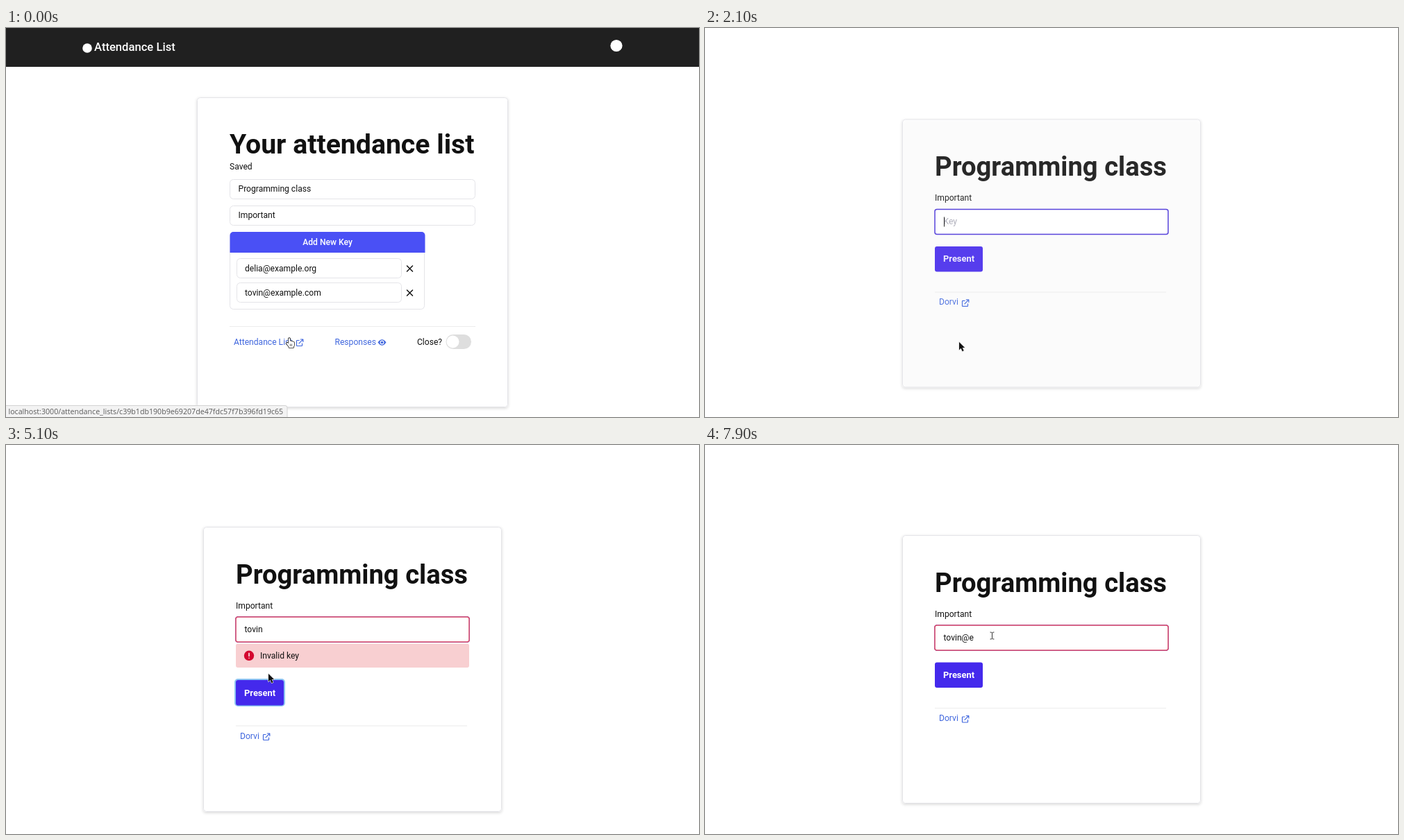
Recreate the animation shown at these times as an HTML page with a canvas. Size 998 by 561 pixels, loop 8 s.

```html
<!DOCTYPE html>
<html lang="en">
<head>
<meta charset="utf-8">
<title>Attendance List</title>
<style>
  html, body { margin: 0; width: 100%; height: 100%; overflow: hidden; background: #fff; }
  canvas { display: block; }
</style>
</head>
<body>
<canvas id="stage" width="998" height="561"></canvas>
<script>
const ctx = document.getElementById('stage').getContext('2d');
const LOOP = 8000, STEP = 100, BLINK = 600;
const LINK = '#4067de', INK = '#111', LINE = '#e4e4e8';
const KEY = 'tovin@e';

// Times: page swap, typing, submit, refocus.
const SWAP = 1700, FADE_START = 1750, FADE_MS = 550;
const TYPED = [2800, 3000, 3300, 3400, 3600, 6500, 7200];
const HOVER = 4600, BLUR = 4700, ERROR = 4900, REFOCUS = 5700, ERROR_END = 6500;

// Pointer stops: time, x, y
const PATH = [
  [0, 408, 447], [700, 408, 447], [1500, 366, 453], [2100, 366, 453], [2600, 440, 403],
  [4300, 440, 403], [4700, 378, 330], [5200, 378, 330], [5700, 413, 275], [LOOP, 413, 275]
];

const clamp = v => Math.min(1, Math.max(0, v));
const progress = (t, start, ms) => clamp((t - start) / ms);

function text(str, x, y, { size = 12.1, weight = 400, color = INK, align = 'left', font = 'Roboto' } = {}) {
  ctx.font = `${weight} ${size}px "${font}", sans-serif`;
  ctx.fillStyle = color;
  ctx.textAlign = align;
  ctx.fillText(str, x, y);
}

function box(x, y, w, h, r, fill, stroke, lineWidth = 1) {
  ctx.beginPath();
  ctx.roundRect(x, y, w, h, r);
  if (fill) { ctx.fillStyle = fill; ctx.fill(); }
  if (stroke) { ctx.strokeStyle = stroke; ctx.lineWidth = lineWidth; ctx.stroke(); }
}

function disc(x, y, r, color) {
  ctx.beginPath();
  ctx.arc(x, y, r, 0, 2 * Math.PI);
  ctx.fillStyle = color;
  ctx.fill();
}

function path(d, x, y, { fill, stroke, width = 1.2 } = {}) {
  const shape = new Path2D(d);
  ctx.save();
  ctx.translate(x, y);
  ctx.lineWidth = width;
  ctx.lineCap = ctx.lineJoin = 'round';
  if (stroke) { ctx.strokeStyle = stroke; ctx.stroke(shape); }
  if (fill) { ctx.fillStyle = fill; ctx.fill(shape, 'evenodd'); }
  ctx.restore();
}

function card(x, y, w, h) {
  ctx.save();
  ctx.shadowColor = 'rgba(0,0,0,.16)';
  ctx.shadowBlur = 4;
  ctx.shadowOffsetY = 1.5;
  box(x, y, w, h, 4, '#fff');
  ctx.restore();
  box(x + .5, y + .5, w - 1, h - 1, 4, null, LINE);
}

const field = (x, y, w) => box(x + .5, y + .5, w - 1, 28, 5, '#fff', LINE);
const rule = (x, y, w) => box(x, y, w, 1, 0, '#ececec');
const externalIcon = (x, y) =>
  path('M4 2H1.2Q.5 2 .5 2.7V9.3Q.5 10 1.2 10H7.8Q8.5 10 8.5 9.3V6.5M6.3 .5H9.8V4M9.6 .7L4 6.3', x, y, { stroke: LINK });

function listPage() {
  box(0, 0, 998, 56, 0, '#202020');
  disc(117, 29, 6.8, '#fff');
  text('Attendance List', 127, 33, { size: 16.6, weight: 500, color: '#fff' });
  disc(879, 25.5, 8.6, '#fff');

  card(275, 100, 448, 447);
  text('Your attendance list', 322, 181, { size: 39.2, weight: 700 });
  text('Saved', 322, 204);
  field(322, 218, 354);
  text('Programming class', 334.5, 236);
  field(322, 256, 354);
  text('Important', 334.5, 274);

  box(322.5, 294.5, 280, 111, 5, '#fff', LINE);
  box(322.5, 294, 281, 30, [5, 5, 0, 0], '#4a50f5');
  text('Add New Key', 463, 313, { weight: 500, color: '#fff', align: 'center' });
  ['delia@example.org', 'tovin@example.com'].forEach((mail, i) => {
    const y = 332 + 35 * i;
    field(332, y, 238);
    text(mail, 344, y + 19);
    path('M-4 -4L4 4M4 -4L-4 4', 581.5, y + 15, { stroke: INK, width: 1.5 });
  });

  rule(322, 430, 354);
  text('Attendance List', 328, 457, { color: LINK });
  externalIcon(418, 448.5);
  text('Responses', 473.5, 457, { color: LINK });
  path('M0 0Q6 -8.4 12 0Q6 8.4 0 0Z', 535.5, 453.5, { fill: LINK });
  disc(541.5, 453.5, 2.9, '#fff');
  disc(541.5, 453.5, 1.8, LINK);
  text('Close?', 592, 457);
  box(633.5, 442, 36.5, 21, 10.5, '#dedede');
  disc(643.5, 452.5, 9, '#fff');

  box(-1, 544.5, 406, 18, [0, 3, 0, 0], '#f3f3f3', '#d2d2d2');
  text('localhost:3000/attendance_lists/c39b1db190b9e69207de47fdc57f7b396fd19c65', 3.5, 556.5,
    { size: 10.65, color: '#5a5a5a', font: 'Open Sans' });
}

function caretVisible(t) {
  if (t >= BLUR && t < REFOCUS) return false;
  const restart = Math.max(...[2000, REFOCUS, ...TYPED].filter(k => k <= t));
  return Math.floor((t - restart) / BLINK) % 2 === 0;
}

function keyPage(t) {
  const left = (1 - progress(t, FADE_START, FADE_MS)) ** 3;
  const failed = t >= ERROR && t < ERROR_END;
  const lift = failed ? -12 : 0, drop = failed ? 25.5 : 0;
  ctx.save();
  ctx.globalAlpha = clamp(1 - 2 * left);
  ctx.translate(0, 30 * left);

  card(284, 130 + lift, 430, failed ? 411 : 387);
  ctx.save();
  ctx.translate(0, lift);
  text('Programming class', 331, 211.5, { size: 38.2, weight: 700 });
  text('Important', 331, 248);
  box(331, 260, 336, 36, 3, '#fff', '#4630d8', 1.5);
  ctx.save();
  ctx.globalAlpha *= progress(t, 2900, 200);
  box(331, 260, 336, 36, 3, '#fff', '#dc4a66', 1.5);
  ctx.restore();

  const value = KEY.slice(0, TYPED.filter(k => k <= t).length);
  if (!value) text('Key', 343.5, 283.5 - 1.5, { color: '#a6a6b4' });
  text(value, 343.5, 282);
  if (t >= 2000 && caretVisible(t)) {
    box(Math.round(343.5 + ctx.measureText(value).width), 271, 1, 14, 0, INK);
  }
  ctx.restore();

  if (failed) {
    box(331, 286.5, 336, 34.5, 3, '#f8cfd1');
    disc(350, 303.8, 7.2, '#d4062f');
    path('M0 -3.6V.8M0 3.4V3.5', 350, 303.8, { stroke: '#fff', width: 1.5 });
    text('Invalid key', 366, 308);
  }

  ctx.save();
  ctx.translate(0, drop);
  const ring = t >= BLUR ? 1 - progress(t, REFOCUS + 50, 150) : 0;
  if (ring) {
    ctx.save();
    ctx.globalAlpha *= ring;
    box(330, 312.5, 71, 38, 4, null, '#8cc4f2', 2);
    ctx.restore();
  }
  const hovered = t >= HOVER && t < ERROR;
  box(331, 313.5, 69, 36.5, 3, hovered ? '#3b55b2' : '#4429ec');
  text('Present', 365.5, 336, { size: 12.9, weight: 700, color: '#fff', align: 'center' });
  rule(331, 379, 333);
  text('Dorvi', 337, 398, { color: LINK });
  externalIcon(370, 390);
  ctx.restore();
  ctx.restore();
}

function pointer(t) {
  const i = PATH.findIndex(stop => stop[0] > t);
  const [t0, x0, y0] = PATH[i - 1], [t1, x1, y1] = PATH[i];
  const p = (t - t0) / (t1 - t0), e = p * p * (3 - 2 * p);
  const x = x0 + (x1 - x0) * e, y = y0 + (y1 - y0) * e;

  if (t < 1500 || (t >= HOVER && t < ERROR)) {
    path('M-1.2 .8Q0 -.5 1.2 .8V4.5Q2.5 4 3.3 5Q4.6 4.5 5.3 5.6Q7 5.3 7 7V10Q7 11.5 6 12.5V14H-.5V12.8L-4.2 8.2Q-4.6 6.6 -3 6.7L-1.2 8.2Z',
      x, y, { fill: '#fff', stroke: '#222', width: 1.6 });
    path('M1.4 9V11.5M3.4 9V11.5', x, y, { stroke: '#222', width: .7 });
  } else if (t >= 5500) {
    path('M-2.5 -5Q-.5 -5 0 -4Q.5 -5 2.5 -5M0 -4V4M-2.5 5Q-.5 5 0 4Q.5 5 2.5 5', x + .5, y, { stroke: '#333', width: 1 });
  } else {
    path('M0 0V11.2L2.6 8.8L4.6 13.2L6.6 12.3L4.6 8H8Z', x, y, { fill: '#111', stroke: '#ddd', width: 1.4 });
  }
}

function frame() {
  const t = Math.floor(performance.now() % LOOP / STEP) * STEP;
  ctx.fillStyle = '#fff';
  ctx.fillRect(0, 0, 998, 561);
  if (t < SWAP) listPage(); else keyPage(t);
  pointer(t);
  requestAnimationFrame(frame);
}
frame();
</script>
</body>
</html>
```
